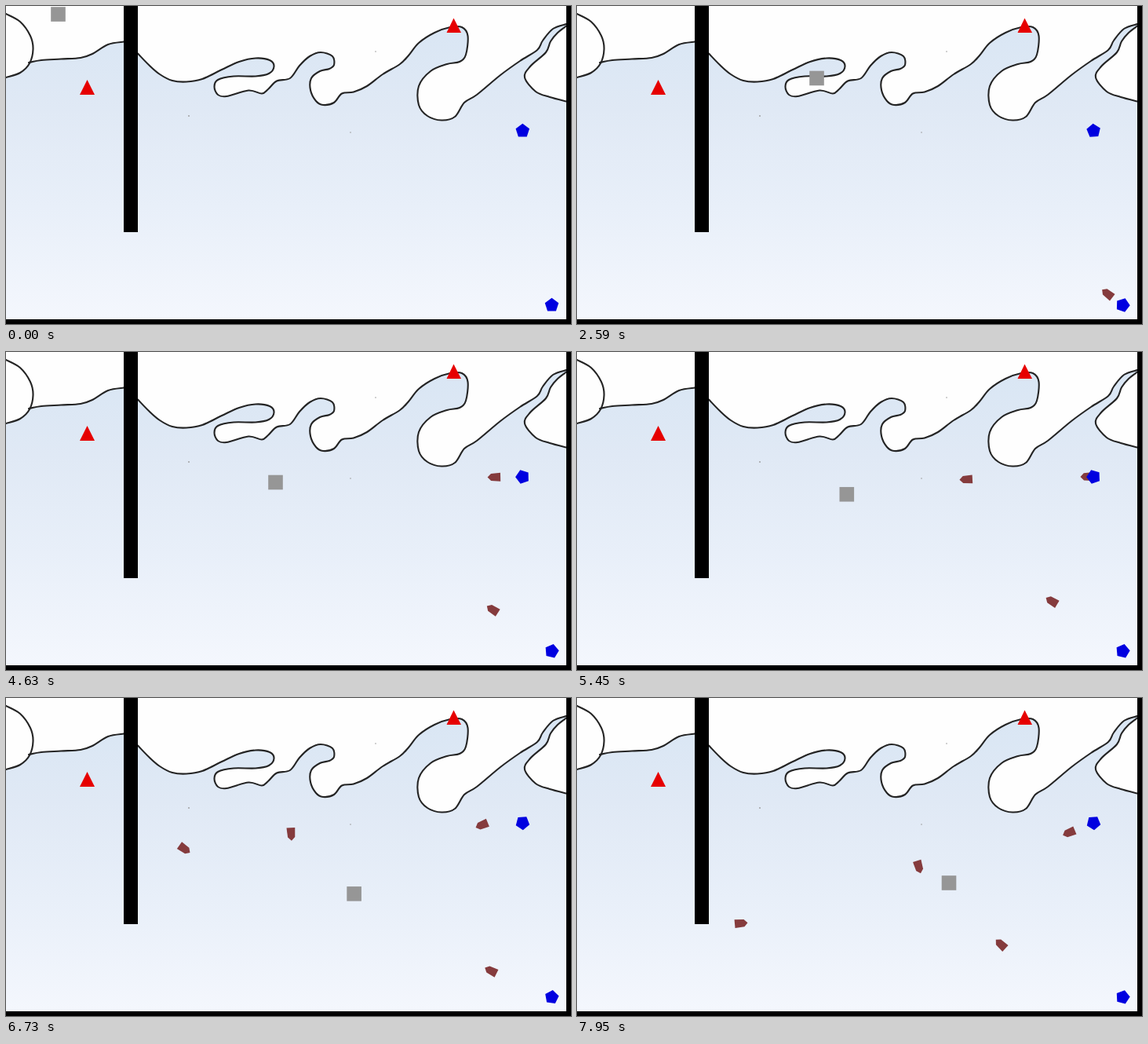
An HTML page that plays this animation: 720 px wide and 405 px high, repeating every 8 s.

```html
<!DOCTYPE html>
<html lang="en">
<head>
<meta charset="utf-8">
<title>Homing darts</title>
<style>
  html, body { margin: 0; width: 100%; height: 100%; overflow: hidden; background: #fff; }
  svg { display: block; width: 100vw; height: 100vh; }
  .ink { fill: none; stroke: #242424; stroke-width: 2.1; stroke-linejoin: round; stroke-linecap: round; }
  .snow { fill: #fefefe; }
</style>
</head>
<body>
<svg viewBox="0 0 720 405">
  <defs>
    <linearGradient id="water" gradientUnits="userSpaceOnUse" x1="0" y1="20" x2="0" y2="400">
      <stop offset="0" stop-color="#d9e6f4"/>
      <stop offset=".3" stop-color="#e0e9f5"/>
      <stop offset=".62" stop-color="#e8eff9"/>
      <stop offset="1" stop-color="#f4f7fd"/>
    </linearGradient>
  </defs>
  <rect width="720" height="405" class="snow"/>
  <g id="land"></g>
  <g fill="#999">
    <circle cx="233" cy="140" r=".9"/><circle cx="439" cy="161" r=".8"/><circle cx="471" cy="58" r=".8"/>
  </g>
  <path d="M150 0H168V288H150ZM714 0H720V405H0V399H714Z"/>
  <path d="M103.5 94L113 113H94ZM570.5 15.5L580 34H561.5Z" fill="#e60000"/>
  <g id="darts" fill="#853b3d"></g>
  <g id="turrets" fill="#0000e0"></g>
  <rect id="player" x="-9.3" y="-9.3" width="18.6" height="18.6" fill="#969696"/>
</svg>
<script>
const LOOP = 8000, STEP = 10;
const $ = id => document.getElementById(id);
const clamp = (v, lo, hi) => Math.min(hi, Math.max(lo, v));

function add(parent, tag, attrs) {
  const node = document.createElementNS('http://www.w3.org/2000/svg', tag);
  for (const key in attrs) node.setAttribute(key, attrs[key]);
  return parent.appendChild(node);
}

// Smooth curve through "x,y x,y ..." as path data
function curve(text) {
  const p = text.trim().split(/\s+/).map(s => s.split(',').map(Number));
  const at = i => p[clamp(i, 0, p.length - 1)];
  const handle = (i, sign) => at(i).map((v, k) => v + sign * (at(i + 1)[k] - at(i - 1)[k]) / 6);
  return 'M' + p[0] + p.slice(1).map((q, i) => `C${handle(i, 1)} ${handle(i + 1, -1)} ${q}`).join('');
}

const shore = curve('29,72 45,69 70,67.5 95,66 110,61 130,49 150,45.5');
const waves = curve(`168,60.5 182,75 196,87 212,95 230,96.5 250,93 275,81 297,71 318,66.5
  336,69 341.5,77 335,86 318,89.5 290,89.5 270,94 265.5,103 270,113 281,115 309,107.5 326,111.5
  334,106 345,95.5 362,92 374,76 387,64 401,59 416,64 418,75 412,80 400,83 389,92 388,107
  395,121 404,126 418,123 428,111.5 443,109.5 460,102 480,87 502,74 513,63 526,47 546,34
  566,27 581,27 588.5,38 586,62 578,71 562,74 541,83 526,102 526,126 537,140 555,145.5
  572,141 584,123 600,113 630,88 655,70 677,56 684,44 697,29 714,23`);
const cove = curve('714,25.5 703,34 694,45 688,59 668,77 661,91 675,109 693,116 714,121.5');
const blob = curve('0,10 18,20 31,38 34.5,55 30,73 18,85 0,91');

const land = $('land');
add(land, 'path', { d: `${shore}H168${waves.replace('M', 'L')}V400H0V72Z`, fill: 'url(#water)' });
for (const d of [blob, cove]) {
  add(land, 'path', { d, class: 'snow' });
  add(land, 'path', { d, class: 'ink' });
}
for (const d of [shore, waves]) add(land, 'path', { d, class: 'ink' });

// Key points are [time, x, y]
function segment(keys, t) {
  let i = 0;
  while (i < keys.length - 2 && t >= keys[i + 1][0]) i++;
  const span = keys[i + 1][0] - keys[i][0];
  return [i, clamp((t - keys[i][0]) / span, 0, 1), span];
}

function linear(keys, t) {
  const [i, u] = segment(keys, t);
  return [1, 2].map(k => keys[i][k] + (keys[i + 1][k] - keys[i][k]) * u);
}

// Cubic motion through the keys, starting from rest
function glide(keys, t) {
  const [i, u, span] = segment(keys, t), w = 1 - u;
  const speed = (j, k) => {
    if (j === 0) return 0;
    const a = keys[j - 1], b = keys[Math.min(keys.length - 1, j + 1)];
    return (b[k] - a[k]) / (b[0] - a[0]) * span;
  };
  return [1, 2].map(k => keys[i][k] * w * w * (1 + 2 * u) + speed(i, k) * u * w * w
    + keys[i + 1][k] * u * u * (3 - 2 * u) - speed(i + 1, k) * u * u * w);
}

const walk = [
  [790, 66.5, 10.5], [920, 66.5, -10], [1910, 236, -8], [2030, 253, 10.5], [2970, 341, 147],
  [3120, 343.5, 166], [5340, 343.5, 166], [5900, 345, 243], [6220, 382, 250.5],
  [6900, 464, 249], [7280, 474, 235.5]
];
const playerAt = t => linear(walk, t);

// The upper turret's darts slow down while the player moves; the lower one's stop while it rests
const overlap = (t, from, to) => clamp(t - from, 0, to - from);
const upperTime = t => t - 0.558 * overlap(t, 5450, 7340);
const lowerTime = t => t - overlap(t, 3120, 5340) - overlap(t, 7280, LOOP);

const upper = { x: 658.3, y: 159, wake: 2210, clock: upperTime };
const lower = { x: 695.5, y: 381, wake: 1400, clock: lowerTime };
const turrets = [upper, lower];
const darts = [
  launch(upper, 4050, [[4940, 587, 160], [5450, 496, 162.3], [5790, 421, 165.5], [6285, 300, 192], [6895, 209, 287]]),
  launch(upper, 5150, [[5790, 627, 160], [6285, 569.5, 169], [6895, 435.5, 215]]),
  launch(upper, 6300, [[6895, 627, 171.5]]),
  launch(lower, 2100, [[3120, 620, 328], [4000, 447, 220], [4620, 178, 187]], 4620),
  launch(lower, 3700, [[5060, 540, 313.5]])
];

function launch(turret, born, points, end = Infinity) {
  return { clock: turret.clock, born, end, keys: [[born, turret.x, turret.y], ...points] };
}

// Everything that aims turns toward the player with a short lag
const LAG = 160;
function turn(angle, [x, y], t, elapsed) {
  const [px, py] = playerAt(t);
  const gap = Math.atan2(py - y, px - x) - angle;
  return angle + Math.atan2(Math.sin(gap), Math.cos(gap)) * (1 - Math.exp(-elapsed / LAG));
}

function headings(start, position, elapsed) {
  let angle = start;
  return Array.from({ length: LOOP / STEP }, (_, i) => {
    const t = i * STEP;
    return angle = turn(angle, position(t), t, elapsed(t));
  });
}

for (const turret of turrets) {
  const { x, y, wake } = turret;
  turret.angles = headings(1.1 * Math.PI, () => [x, y], t => t < wake ? 0 : STEP);
}
for (const dart of darts) {
  const { clock, born, keys } = dart;
  dart.angles = headings(Math.PI, t => glide(keys, clock(t)), t => {
    const age = clock(t) - born;
    if (age < 0) return 0;
    return age < STEP ? Infinity : clock(t) - clock(t - STEP);
  });
  dart.node = add($('darts'), 'polygon', { points: '8.5,0 4,-4.6 -8,-5.4 -8,5.4 4,4.6' });
}

const corners = [0, 1, 2, 3, 4].map(i => {
  const a = i * Math.PI * 0.4;
  return `${9.2 * Math.cos(a)},${9.2 * Math.sin(a)}`;
}).join(' ');
for (const turret of turrets) turret.node = add($('turrets'), 'polygon', { points: corners });

function place(node, [x, y], angle = 0) {
  node.setAttribute('transform', `translate(${x} ${y}) rotate(${angle * 180 / Math.PI})`);
}

function draw(t) {
  const step = Math.floor(t / STEP);
  place($('player'), playerAt(t));
  for (const { node, x, y, angles } of turrets) place(node, [x, y], angles[step]);
  for (const { node, clock, born, end, keys, angles } of darts) {
    const now = clock(t), alive = now >= born && now < end;
    node.setAttribute('visibility', alive ? 'visible' : 'hidden');
    if (alive) place(node, glide(keys, now), angles[step]);
  }
}

const start = performance.now();
function tick() {
  draw((performance.now() - start) % LOOP);
  requestAnimationFrame(tick);
}
tick();
</script>
</body>
</html>
```
